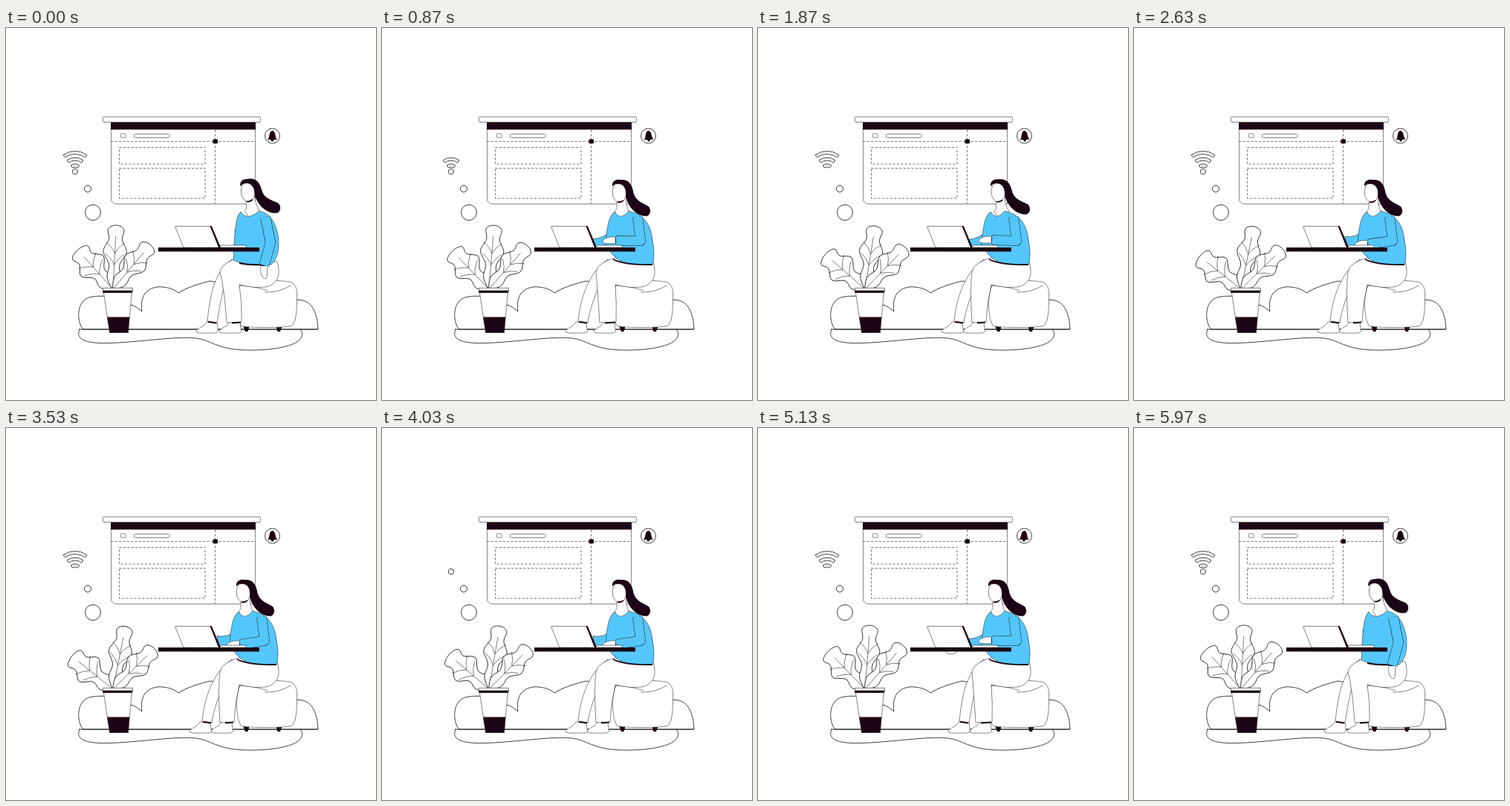
Recreate the animation shown at these times as an HTML page. Size 498 by 500 pixels, loop 6.01 s.

```html
<!DOCTYPE html>
<html lang="en">
<head>
<meta charset="utf-8">
<title>Working at a desk</title>
<style>
html, body { margin: 0; width: 100%; height: 100%; overflow: hidden; background: #fff }
svg { display: block; width: 498px; height: 500px }
.line { fill: #fff; stroke: #222; stroke-width: .55; stroke-linejoin: round }
.rim { stroke: #111; stroke-width: .8; shape-rendering: crispEdges }
.open { fill: none }
.dash { fill: none; stroke-width: .8; stroke: #555; stroke-dasharray: 3.2 2.2 }
.dark { fill: #1b0413; stroke: none }
.blue { fill: #53c7fb }
.edge { fill: none; stroke: #1b0413; stroke-width: 1.8 }
</style>
</head>
<body>
<svg viewBox="0 0 498 500">
  <g class="line">
    <!-- landscape -->
    <path class="rim" d="M99 405C90 426 130 424 150 423C200 420 240 413 262 418C280 423 290 433 328 433C360 433 388 428 396 418C402 410 396 404 390 393"/>
    <path class="rim" d="M104 405C94 394 94 362 118 361C142 358 152 365 166 371Q176 374 183 381C179 356 194 347 210 348Q224 349 232 356Q246 347 275 340L390 366C407 363 419 376 420 405Z"/>
    <path class="open" d="M98 405H420" stroke-width="1"/>

    <!-- wall screen -->
    <path d="M141.5 127H335.5V236.5H149Q141.5 236.5 141.5 228Z"/>
    <rect x="130.5" y="119.5" width="212" height="7" rx="1"/>
    <rect class="dark" x="141" y="127" width="195" height="9.5"/>
    <rect x="154" y="142" width="7.5" height="5.5" rx="2.5"/>
    <rect x="172" y="142.5" width="48.5" height="5" rx="2.5"/>
    <path class="dash" d="M141 152.5H336M281.5 137V236M152.5 160.5H268V183H152.5ZM152.5 188.5H268V229H152.5Z"/>
    <rect class="dark" x="278.5" y="149.5" width="6.5" height="5.7"/>

    <!-- bell, bubbles, signal -->
    <circle class="rim" cx="358.5" cy="145" r="10"/>
    <g id="bell" class="dark">
      <path d="M352 150Q354 148 354.5 144Q355 139 358.5 138Q362 139 362.5 144Q363 148 365 150Z"/>
      <circle cx="358.5" cy="150.5" r="2"/>
    </g>
    <circle class="rim" cx="110" cy="216" r="4.5"/>
    <circle class="rim" cx="117" cy="248" r="10.5"/>
    <g id="signal" class="rim"><circle cx="93" cy="193" r="3.7"/></g>

    <!-- plant -->
    <g id="plant"></g>
    <path d="M131 353L139.5 409.5H164.5L169.5 353Z"/>
    <path class="dark" d="M136.3 388.5H166.3L164.5 409.5H139.5ZM130 353H170.5L170 356H130.4Z"/>
    <rect x="130.5" y="349.5" width="40" height="3.5"/>

    <!-- seat -->
    <path class="dark" d="M319 400H328L325.5 408H322ZM363 400H372L369 408H365.5Z"/>
    <path d="M316 344C308 360 309 390 317 401C335 403 365 403 383 401C391 396 391 382 391.5 368C392 354 392 346 384 342C370 338 330 338 316 344Z"/>
    <path class="open" d="M313 346Q335 347 352 353M348 355Q367 356 383 346"/>

    <!-- woman -->
    <g id="farFoot"><path id="shoe" d="M14 0C11 7 2 8 0 12Q0 15 4 15H26Q31 14 29 9L28 1Z"/></g>
    <path id="farLeg"/><path id="farCuff" class="edge"/>
    <g id="nearFoot"><use href="#shoe"/></g>
    <path id="nearLeg"/><path id="nearCuff" class="edge"/>
    <path id="farArm" class="blue"/>
    <g class="head"><path d="M315 228C317 240 316 244 313 247L322 262L333 248C329 241 328 235 328 222Z"/></g>
    <path id="torso" class="blue"/><path id="hem" class="edge"/>
    <g class="head">
      <ellipse cx="319.7" cy="221" rx="9.5" ry="13.3"/>
      <path class="edge" stroke-width="1.2" d="M317 234Q321 235 325 232"/>
      <path class="dark" d="M310 213C309 205 316 203 321 204C331 203 336 209 338 219C340 233 352 235 359 240C363 245 361 252 356 253C342 253 331 240 328 226C329 219 327 212 321 210C317 209 313 209 310 213Z"/>
    </g>
    <g id="hand"><path d="M0-4.5C-7-6-16-4-18 1C-18 5-9 4 0 4Z"/><path class="edge" d="M0-4.5V4"/></g>
    <path id="armEdge" fill="none"/>
    <path id="arm" fill="none" style="stroke:#53c7fb"/>

    <!-- table and laptop -->
    <ellipse id="farHand" cx="260" rx="8" ry="5"/>
    <rect class="dark" x="205" y="295" width="136" height="5.5"/>
    <rect x="288" y="292" width="35" height="3"/>
    <path d="M227.5 266.5H275L287 295H239Z"/>
    <path class="dark" d="M274.5 266H276.8L289 295H286Z"/>
  </g>
</svg>
<script>
const LOOP = 6010, { PI, sin, cos } = Math;
const el = id => document.getElementById(id);
const set = (id, name, value) => el(id).setAttribute(name, value);
const clamp = x => Math.max(0, Math.min(1, x));
const ease = (t, from, to) => (1 - cos(PI * clamp((t - from) / (to - from)))) / 2;
// Rises during a..b and falls during c..d.
const hold = (t, a, b, c, d) => ease(t, a, b) - ease(t, c, d);

// Lobed leaf growing upwards from the origin.
function leaf(length, width) {
  const half = u => width * Math.sqrt(u * (1 - u ** 6)) * (.77 + .23 * cos(2 * PI * (1 - u) / .42));
  const edge = [];
  for (let i = -30; i <= 30; i++) {
    const u = cos(i / 30 * PI / 2);
    edge.push([Math.sign(i) * half(u), -length * u]);
  }
  let veins = `M0 0V${-length * .83}`;
  for (const u of [.38, .56])
    for (const side of [-1, 1])
      veins += `M0 ${-length * u}q${side * width * .2} ${-length * .1} ${side * width * .6} ${-length * .17}`;
  return `<path class="rim" d="M${edge.join('L')}Z"/><path class="open" d="${veins}"/>`;
}
const leaves = [
  { angle: -42, turn: -10, length: 71, width: 27 },
  { angle: 3, turn: 9, length: 86, width: 21 },
  { angle: 40, turn: 6, length: 78, width: 22 }
];
el('plant').innerHTML = leaves.map(l => `<g>${leaf(l.length, l.width)}</g>`).join('');
const leafNodes = [...el('plant').children];

function band(outer) {
  const inner = outer - 3.8;
  const at = (r, side) => `${93 + side * r * sin(.62)} ${193 - r * cos(.62)}`;
  return `<path d="M${at(outer, -1)}A${outer} ${outer} 0 0 1 ${at(outer, 1)}L${at(inner, 1)}A${inner} ${inner} 0 0 0 ${at(inner, -1)}Z"/>`;
}
for (let i = 0; i < 3; i++) el('signal').innerHTML += band(10 + 8.7 * i);
const signalNodes = [...el('signal').children];

function draw(t) {
  const wave = period => sin(2 * PI * t / period);

  const sway = ease(t, 0, LOOP / 2) - ease(t, LOOP / 2, LOOP);
  leafNodes.forEach((n, i) => {
    const { angle, turn } = leaves[i];
    n.setAttribute('transform', `translate(144 351) rotate(${angle + turn * sway})`);
  });

  const phase = t % 1650;
  signalNodes.forEach((n, i) => {
    const hidden = phase >= 100 + 150 * i && phase < 650 + 100 * i;
    n.style.visibility = hidden ? 'hidden' : '';
  });
  set('bell', 'transform', `rotate(${4 * wave(LOOP / 6)} 358.5 139)`);

  const rest = 1 - hold(t, 80, 780, 5170, 5880);
  const pose = (typing, resting) => typing + (resting - typing) * rest;

  const nod = sin(PI * clamp((t - 1000) / 1700)) ** 2;
  const lift = Math.max(rest, .6 * nod);
  for (const n of document.querySelectorAll('.head'))
    n.setAttribute('transform', `translate(${6 * lift} ${-lift}) rotate(${-5 * lift} 320 220)`);

  // Torso leans back a little when resting.
  const waist = pose(301, 306), back = pose(363, 366), neck = pose(313, 316);
  set('torso', 'd', `M${neck} 247C${pose(304, 309)} 254 ${waist + 2} 270 ${waist} ${pose(290, 312)}`
    + `Q${pose(314, 320)} 319 345 318H${pose(364, 357)}C368 308 ${back + 2} 290 ${back} 278`
    + `C${back - 4} 260 ${pose(350, 356)} 250 ${pose(332, 341)} 246Q${neck + 8} 260 ${neck} 247Z`);
  set('hem', 'd', `M${pose(311, 314)} ${pose(311, 316)}Q328 319 ${pose(364, 343)} 318`);

  const tap = -3 * cos(2 * PI * (t - 1870) / 474) * (1 - rest);
  const wrist = [pose(315, 347.5), pose(288, 319) + tap];
  const bones = `M${pose(344, 349)} 254L${pose(348, 356)} ${pose(286, 288)}L${wrist}`;
  const thick = pose(12.5, 17);
  for (const [id, extra] of [['armEdge', 1.1], ['arm', 0]]) {
    set(id, 'd', bones);
    set(id, 'stroke-width', thick * (1 - .25 * rest) + extra);
  }
  set('hand', 'transform', `translate(${wrist}) rotate(${-90 * rest})`);

  const tipX = pose(284, 312), tipY = 282 - tap * .8;
  set('farArm', 'd', `M308 272Q${pose(300, 312)} 282 ${tipX} ${tipY}L${tipX + 3} 293H312Z`);
  set('farHand', 'cy', 295 + 4 * sin(PI * clamp((t - 5030) / 200)));
  el('farHand').style.visibility = t > 5030 && t < 5230 ? '' : 'hidden';

  // Feet slide forward one after the other, then back.
  const far = hold(t, 230, 830, 4350, 5030), near = hold(t, 900, 1500, 4450, 5110);
  const fx = 271 - 7 * far;
  set('farFoot', 'transform', `translate(${256 - 9 * far} 395)`);
  set('farLeg', 'd', `M304 311C282 326 ${fx + 4} 355 ${fx} 394L${fx + 13} 396Q${fx + 17} 370 295 340Z`);
  set('farCuff', 'd', `M${fx + 1} 395L${fx + 12} 396.5`);

  const left = 293 + 4 * rest - 5 * near, right = 315 + 2 * rest - 8 * near;
  set('nearFoot', 'transform', `translate(${285 + 2 * rest - 9 * near} 395)`);
  set('nearLeg', 'd', `M314 309C298 313 290 319 288 328Q${left - 3} 350 ${left} 396L${right} 395`
    + `Q${right + 1} 370 314 345Q335 350 350 348C366 344 370 332 365 314Z`);
  set('nearCuff', 'd', `M${left + 7} 396.5L${right - 1} 395.7`);
}

function frame(now) {
  draw(now % LOOP);
  requestAnimationFrame(frame);
}
draw(0);
requestAnimationFrame(frame);
</script>
</body>
</html>
```
